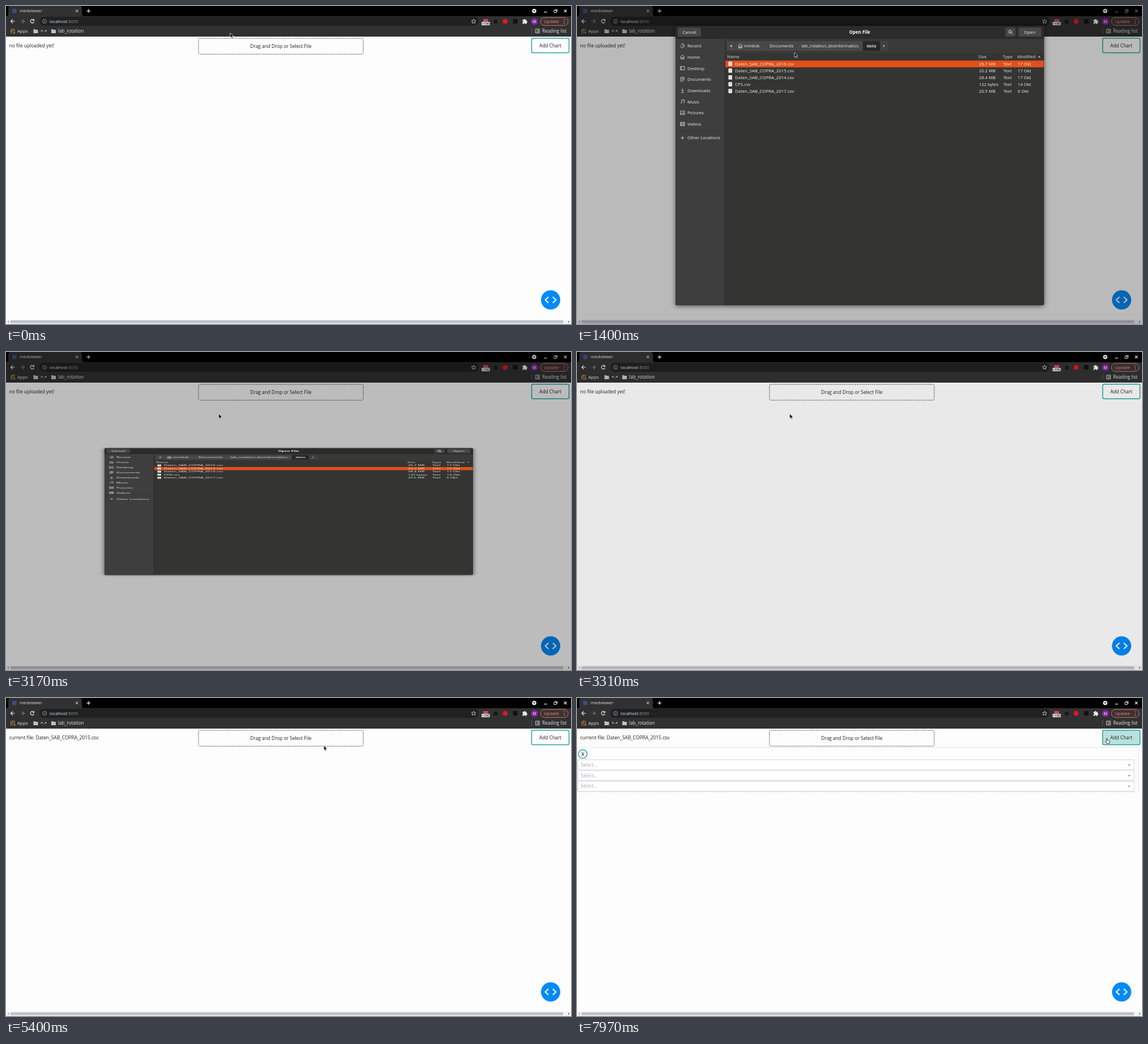
An HTML page for the animation above (8 s loop, 998 px wide and 561 px high).

```html
<!DOCTYPE html>
<html lang="en">
<head>
<meta charset="utf-8">
<title>medviewer</title>
<style>
  html, body { margin: 0; width: 100%; height: 100%; overflow: hidden; background: #fdfdfd; }
  svg { display: block; width: 998px; height: 561px; font-family: "Open Sans", "Noto Sans", sans-serif; }
  text { white-space: pre; }
</style>
</head>
<body>
<svg id="stage" viewBox="0 0 998 561" xmlns="http://www.w3.org/2000/svg"></svg>
<script>
const LOOP = 8000;
const TEAL = '#25a59a';

// Drawing helpers; text is placed by the middle of its capitals.
const text = (x, y, str, size = 8.35, fill = '#222', more = '') =>
  `<text x="${x}" y="${y + size * 0.36}" font-size="${size}" fill="${fill}" ${more}>${str}</text>`;
const centred = (x, y, str, size, fill, more = '') =>
  text(x, y, str, size, fill, `text-anchor="middle" ${more}`);
const rect = (x, y, w, h, fill, r = 0, more = '') =>
  `<rect x="${x}" y="${y}" width="${w}" height="${h}" fill="${fill}" rx="${r}" ${more}/>`;
const circle = (x, y, r, fill, more = '') =>
  `<circle cx="${x}" cy="${y}" r="${r}" fill="${fill}" ${more}/>`;
const line = (d, stroke = '#eee', width = 1, more = '') =>
  `<path d="${d}" fill="none" stroke="${stroke}" stroke-width="${width}" ${more}/>`;
const shape = (d, fill) => `<path d="${d}" fill="${fill}"/>`;
const group = (id, body) => `<g id="${id}">${body}</g>`;

function browser() {
  const bar = '#313132';
  const folder = x => shape(`M${x} 41h3l1 1h4v6h-8z`, '#bfc1c4');
  const palette = ['#e8453c', '#f9bb2d', '#3aa757'];
  const apps = Array.from({ length: 9 }, (_, i) =>
    rect(8 + i % 3 * 3, 40.5 + Math.floor(i / 3) * 3, 1.9, 1.9, palette[(i + Math.floor(i / 3)) % 3])).join('');
  return rect(0, 0, 998, 18, '#000') +
    shape('M0 18q4 0 4-4V4q0-4 4-4h122q4 0 4 4v10q0 4 4 4z', bar) +
    rect(0, 18, 998, 36, bar) +
    rect(11, 5, 7.5, 7.5, '#3b4d86') +
    group('tabTitle', text(24, 8.5, 'medviewer', 7.8, '#e4e4e6')) +
    line('M123 6.5l4.4 4.4m0-4.4l-4.4 4.4') +
    line('M142.5 8.8h6.6m-3.3-3.3v6.6', '#eee', 1.2) +
    circle(933, 8.7, 3.8, '#eee') + shape('M931 7.8h4l-2 2.3z', '#000') +
    group('controls', line('M950.5 10.7h5', 'currentColor', 1.3) +
      line('M968 7.5h4v4h-4zm1.5-1.4h4v4', 'currentColor') +
      line('M985.7 6.4l4.6 4.6m0-4.6l-4.6 4.6', 'currentColor', 1.2)) +
    line('M15.5 27H8.5m3.4-3.4L8.5 27l3.4 3.4', '#eee', 1.2) +
    line('M25.5 27h7m-3.4-3.4l3.4 3.4l-3.4 3.4', '#77787b', 1.2) +
    line('M49 25a3.2 3.2 0 1 0 .4 3', '#eee', 1.2) + shape('M50 22.8v3.5h-3.5z', '#eee') +
    rect(59, 19, 776, 16, '#202122', 8) +
    circle(68, 27, 3.5, 'none', 'stroke="#aaa" stroke-width=".8"') + line('M68 26.5v2.6m0-4.2v.9', '#aaa', .9) +
    text(77, 27, 'localhost<tspan fill="#93969a">:8050</tspan>', 7.45, '#e8e8e8') +
    line('M826 23.2l1.1 2.6 2.8.2-2.1 1.8.7 2.7-2.5-1.4-2.5 1.4.7-2.7-2.1-1.8 2.8-.2z', '#ddd', .8) +
    rect(843, 23, 8.5, 6, '#c94a55') + rect(840, 28, 14.5, 6, '#dcdcdc', 1) +
    centred(847.2, 31, '&gt;15K', 5.4, '#222', 'font-weight="600"') +
    circle(865, 27.5, 3.8, '#19191b') + circle(881.7, 27.2, 4.4, '#e01820') + rect(895.5, 23, 8, 8, '#111') +
    shape('M912.3 24.5h2.2a1.4 1.4 0 0 1 2.8 0h2.2v2.3a1.4 1.4 0 0 1 0 2.8v1.9h-2.4a1.2 1.2 0 0 0-2.4 0h-2.4v-2.2a1.3 1.3 0 0 0 0-2.6z', '#eee') +
    circle(933.4, 27.2, 6, '#8b23a8') + centred(933.4, 27.2, 'M', 6.8, '#fff') +
    rect(944, 20.3, 49, 14, '#3a3233', 7, 'stroke="#dc7b75" stroke-width=".9"') +
    text(950, 27.3, 'Update', 7.9, '#f08b83') +
    [24, 27.2, 30.4].map(y => circle(986, y, .8, '#f08b83')).join('') +
    apps + text(20, 44, 'Apps', 8, '#e6e6e6') +
    folder(48.5) + text(61, 44, '*-*', 8, '#e6e6e6') +
    folder(80) + text(92, 44, 'lab_rotation', 8.15, '#e6e6e6') +
    line('M928.5 39v10', '#5b5b5e') +
    line('M935.3 40.8h7v6.8h-7zm2 2h.8m.8 0h2m-3.6 1.5h.8m.8 0h2m-3.6 1.5h.8m.8 0h2', '#ddd', .9) +
    text(947, 44, 'Reading list', 8.05, '#e6e6e6');
}

function page() {
  const select = y => rect(1.5, y, 982.5, 18, '#fff', 1.5, 'stroke="#cfcfd2" stroke-width=".9"') +
    text(6.5, y + 9, 'Select...', 8.2, '#a9a9ad') + shape(`M972.7 ${y + 8.3}h5l-2.5 2.6z`, '#96969a');
  return rect(0, 54, 998, 507, '#fdfdfd') +
    group('fileLabel', text(5.5, 69.7, 'no file uploaded yet!', 8.4)) +
    rect(340, 57, 291, 28, 'none', 2.5, 'stroke="#333" stroke-width=".9" stroke-dasharray="2 1.3"') +
    centred(485.5, 70.7, 'Drag and Drop or Select File') +
    `<rect id="addButton" x="928.5" y="56.7" width="66" height="25.8" rx="2.5" stroke="${TEAL}" stroke-width="1.5"/>` +
    centred(961.5, 69.7, 'Add Chart') +
    group('chart', rect(.5, 87.5, 991.5, 78.5, 'none', 0, 'stroke="#d2d2d8" stroke-width=".8" stroke-dasharray="2 1.3"') +
      circle(10.2, 98.8, 7.6, '#fdfdfd', `stroke="${TEAL}" stroke-width="1.4"`) +
      centred(10.2, 98.8, 'X', 8, '#222', 'font-weight="600"') + [109, 127.8, 146.5].map(select).join('')) +
    circle(962, 518.5, 17, '#008af8') +
    line('M958.2 513.2l-5.6 5.3 5.6 5.3m7.6-10.6l5.6 5.3-5.6 5.3', '#fff', 2) +
    rect(0, 553, 998, 8, '#f4f4f4') + rect(8, 554.5, 976, 5, '#c0c0cb') +
    shape('M5 555.3v3.6l-2.2-1.8z', '#888') + shape('M993 555.3v3.6l2.2-1.8z', '#555');
}

function dialog() {
  const fg = '#eee';
  const button = (x, w, label) => rect(x, 38, w, 16, '#474747', 2.5) + centred(x + w / 2, 46, label, 7.9, fg);
  // Icon paths are relative to their centre.
  const places = [
    ['Recent', 70.3, 'M-3.5 0a3.5 3.5 0 1 0 1-2.5M0-2v2h2'],
    ['Home', 90, 'M-4 .3L0-3.5 4 .3M-2.7 0v3.6h1.8V1h1.8v2.6h1.8V0'],
    ['Desktop', 109.7, 'M-3.7-3h7.4v6h-7.4zm1.8 0v6'],
    ['Documents', 129.3, 'M-3-3.5h6V1L.8 3.5H-3zM-1.5-1.5h3m-3 1.8h3'],
    ['Downloads', 149, 'M0-3.7v5M-2-.5L0 1.6 2-.5M-2.5 3.6h5'],
    ['Music', 168.7, 'M-1.4 2.5v-5.7h4.6v4.7M-3 2.6h1.6M1.6 1.7h1.6'],
    ['Pictures', 188.4, 'M-3.7-3h7.4v6h-7.4zM-3 2l2-2.4L.6 1 2 0 3 2'],
    ['Videos', 208.2, 'M-3.7-3h7.4v6h-7.4zm1.6 0v6m4.2-6v6M-2 0h4'],
    ['Other Locations', 232.6, 'M-3 0h6M0-3v6']
  ].map(([name, y, icon]) => text(195, y, name, 7.8, fg) +
    line(icon, '#d5d5d5', .9, `transform="translate(186.3 ${y})"`)).join('');

  const crumbs = [
    [265, 14, ''], [279.5, 54.5, ''], [334.5, 54, 'Documents'],
    [389, 115.5, 'lab_rotation_bioinformatics'], [505, 30, 'data']
  ].map(([x, w, label], i) => rect(x, 62, w, 17, i == 4 ? '#282828' : '#484848') +
    centred(x + w / 2, 70.5, label, 7.9, fg, i == 4 ? 'font-weight="600"' : '')).join('') +
    rect(535.5, 62, 13.5, 17, '#424242') +
    line('M284.5 70.8l4-3.7 4 3.7m-6.7-.2v3.6h1.7v-2.4h2v2.4h1.7v-3.6', fg, .9) +
    text(295, 70.5, 'mirelok', 7.9, fg);
  const crumbArrows = shape('M273.3 68.3v4.4l-2.6-2.2z', fg) + shape('M541 68.6v3.8l2.4-1.9z', '#ccc');

  const files = [
    ['Daten_SAB_COPRA_2016.csv', '26.7 MB', '17 Okt'],
    ['Daten_SAB_COPRA_2015.csv', '20.2 MB', '17 Okt'],
    ['Daten_SAB_COPRA_2014.csv', '28.4 MB', '17 Okt'],
    ['CPS.csv', '122 bytes', '14 Okt'],
    ['Daten_SAB_COPRA_2017.csv', '20.5 MB', '6 Okt']
  ].map(([name, size, date], i) => {
    const y = 102.2 + i * 12;
    return rect(267.5, y - 4, 6.5, 7.5, '#f2f2ee', .8) + line(`M269 ${y - 1.5}h3.5m-3.5 2h3.5`, '#999', .6) +
      text(279, y, name, 7.9, fg) + text(710, y, size, 7.7, fg) + text(753, y, 'Text', 7.7, fg) + text(778.5, y, date, 7.7, fg);
  }).join('');

  const heading = (x, label) => text(x, 89.5, label, 7.6, '#b5b5b3', 'font-weight="600"');
  return rect(174, 35, 651, 493, '#343533', 3, 'style="filter:drop-shadow(0 1px 4px #0009)"') +
    shape('M174 58V38q0-3 3-3h645q3 0 3 3v20z', '#2b2b2b') +
    button(178, 41, 'Cancel') + button(779.5, 40.5, 'Open') + button(757, 17.5, '') +
    circle(765, 45.4, 2.4, 'none', `stroke="${fg}"`) + line('M766.7 47.2l2.4 2.4', fg) +
    centred(499.3, 46, 'Open File', 7.9, '#fff', 'font-weight="700"') +
    rect(174, 58, 87, 470, '#3e3e3e') + line('M261.5 58v470', '#292929') + line('M174 220.5h87', '#353535') +
    places + rect(262, 58, 563, 25, '#393938') + group('crumbs', crumbs) + crumbArrows +
    heading(265, 'Name') + heading(709, 'Size') + heading(752, 'Type') + heading(777.5, 'Modified') +
    shape('M814 90.7h5l-2.5-2.6z', '#b5b5b3') +
    '<rect id="selection" x="262" width="562.5" height="12" fill="#e24f18"/>' + files;
}

const cursors =
  group('arrow', '<path d="M0 0v8.5l2-1.8 1.4 3 1.5-.7-1.4-2.9h2.8z" fill="#111" stroke="#f4f4f4" stroke-width=".7"/>') +
  group('hand', '<path d="M-.9 5V.8q.9-1.3 1.8 0v2.6l3.2.7q1 .3.9 1.4l-.6 3.6H.1L-2.5 6q.2-1.2 1.6-.2z" fill="#fff" stroke="#111" stroke-width=".8"/>');

document.getElementById('stage').innerHTML = browser() + page() +
  rect(0, 0, 998, 561, '#000', 0, 'id="dim"') + group('dialog', dialog()) + group('pointer', cursors);

const $ = id => document.getElementById(id);
const progress = (t, start, length) => Math.min(1, Math.max(0, (t - start) / length));
const show = (id, on) => $(id).setAttribute('display', on ? 'inline' : 'none');
const setText = (id, str) => {
  const node = $(id).firstChild;
  if (node.textContent !== str) node.textContent = str;
};

const OPEN = 985, CLOSE = 3122, UPLOAD = 3700, LOADED = 4900, ADDED = 6640;
const DIM = 0.32;
const route = [
  [0, 396, 47.5], [120, 396, 47.5], [620, 384, 82], [1750, 384, 82], [2400, 375.7, 109],
  [5100, 375.7, 109], [5880, 935, 33], [6250, 956, 36], [6430, 956, 47.5], [6580, 936, 71]
];

function pointerAt(t) {
  const next = route.findIndex(p => p[0] > t);
  if (next < 0) return route[route.length - 1].slice(1);
  const [t0, x0, y0] = route[next - 1], [t1, x1, y1] = route[next];
  const p = (t - t0) / (t1 - t0), e = p * p * (3 - 2 * p);
  return [x0 + (x1 - x0) * e, y0 + (y1 - y0) * e];
}

function render(t) {
  const opened = t >= OPEN, closing = t >= CLOSE;
  const modal = opened && !closing;
  const scale = closing ? (1 - progress(t, CLOSE, 150)) ** 2
    : t >= OPEN + 150 ? 1 : 1 - 2 ** (-10 * progress(t, OPEN, 150));
  show('dialog', opened && scale > 0);
  $('dialog').setAttribute('transform', `translate(0 ${281.5 * (1 - scale)}) scale(1 ${scale})`);
  $('dim').setAttribute('opacity', DIM * (closing ? 1 - progress(t, CLOSE, 250) : progress(t, OPEN, 500)));
  $('crumbs').setAttribute('opacity', 0.4 + 0.6 * progress(t, 1050, 200));
  $('selection').setAttribute('y', t < 2820 ? 96.2 : 108.2);
  $('controls').setAttribute('color', modal ? '#858585' : '#eee');

  setText('tabTitle', t >= UPLOAD && t < LOADED ? 'Updating...' : 'medviewer');
  setText('fileLabel', t < LOADED ? 'no file uploaded yet!' : 'current file: Daten_SAB_COPRA_2015.csv');
  show('chart', t >= ADDED);

  const [x, y] = pointerAt(t);
  const overDrop = x > 340 && x < 631 && y > 57 && y < 85 && !opened;
  const overAdd = x > 928 && y > 56 && y < 83;
  $('addButton').setAttribute('fill', overAdd ? '#b9e0dd' : '#fdfdfd');
  show('hand', overDrop || overAdd);
  show('arrow', !overDrop && !overAdd);
  $('pointer').setAttribute('transform', `translate(${x} ${y})`);
}

function tick() {
  render(performance.now() % LOOP);
  requestAnimationFrame(tick);
}
tick();
</script>
</body>
</html>
```
